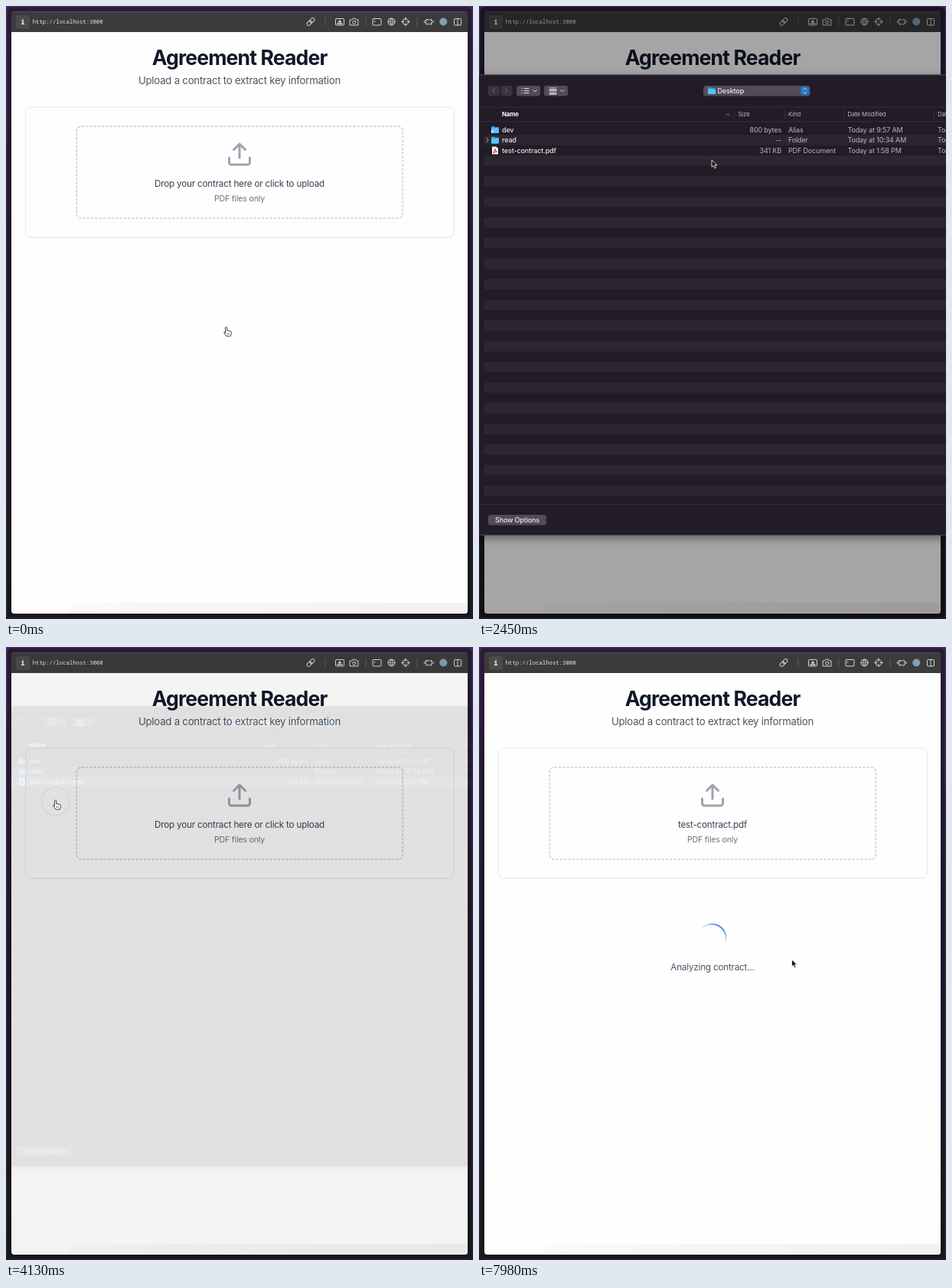
An HTML page for the animation above (8000 ms loop, 610 px wide and 800 px high).

```html
<!DOCTYPE html>
<html lang="en">
<head>
<meta charset="utf-8">
<title>Agreement Reader</title>
<style>
  html, body { margin: 0; width: 100%; height: 100%; overflow: hidden; background: #17121f; }
  svg { display: block; width: 610px; height: 800px; }
  text { font-family: Inter, sans-serif; letter-spacing: -.017em; }
  .mid { text-anchor: middle; }
  .end { text-anchor: end; }
  .mono { font-family: "Noto Sans Mono", monospace; letter-spacing: 0; font-weight: 500; }
  .line { fill: none; stroke-linecap: round; stroke-linejoin: round; }
  #dialog text { font-size: 9px; fill: #b9b5bd; }
  #dialog .name { fill: #e9e7eb; font-weight: 500; }
  #dialog .head { font-size: 7.8px; fill: #bcb8c0; }
</style>
</head>
<body>
<svg viewBox="0 0 610 800">
  <defs>
    <linearGradient id="backdrop" x2="0" y2="1">
      <stop offset="0" stop-color="#4a2369"/><stop offset=".3" stop-color="#2c1c48"/>
      <stop offset=".75" stop-color="#1e172c"/><stop offset="1" stop-color="#17161b"/>
    </linearGradient>
    <linearGradient id="chrome" x2="0" y2="1">
      <stop offset="0" stop-color="#2b1b3a"/><stop offset=".5" stop-color="#1d162b"/>
      <stop offset="1" stop-color="#18171c"/>
    </linearGradient>
    <linearGradient id="footer" x2="1" y2="0">
      <stop offset="0" stop-color="#f9f9fa"/><stop offset="1" stop-color="#f1f1f3"/>
    </linearGradient>
    <filter id="shadow" x="-10%" y="-10%" width="120%" height="120%">
      <feDropShadow dx="0" dy="4" stdDeviation="6" flood-opacity=".4"/>
    </filter>
    <g id="folder">
      <path d="M0 1.2q0-1.2 1.2-1.2h2.6l1.2 1.2h4q1 0 1 1v5.6q0 1.2-1.2 1.2H1.2Q0 9 0 7.8z" fill="#2b9fdc"/>
      <rect y="2.4" width="10" height="6.6" rx="1" fill="#55c3f6"/>
    </g>
  </defs>

  <rect width="610" height="800" fill="url(#backdrop)"/>
  <rect x="1" y="1" width="608" height="798" rx="6" fill="url(#chrome)" stroke="#4b4158" stroke-width=".5"/>
  <path d="M7 34V11q0-4 4-4H599q4 0 4 4V34z" fill="#3b3b3c"/>
  <path d="M9 7.5H601" stroke="#5b575f" stroke-width=".8"/>
  <path d="M7 34H603V789q0 4-4 4H11q-4 0-4-4z" fill="#fefefe"/>
  <path d="M82 793q3-14 20-14H603v10q0 4-4 4z" fill="url(#footer)"/>

  <!-- Toolbar -->
  <rect x="13" y="12" width="18" height="18" rx="3" fill="#4b4b4c"/>
  <text class="mono mid" x="22" y="24" font-size="9" style="font-weight:700" fill="#fff">i</text>
  <text class="mono" x="34.7" y="23.3" font-size="7.3" fill="#e8e8e8">http://localhost:3000</text>
  <g class="line" stroke="#d6d6d6" stroke-width="1">
    <g transform="rotate(-45 398 20.5)">
      <rect x="392" y="18.3" width="6.8" height="4.4" rx="2.2"/>
      <rect x="397.2" y="18.3" width="6.8" height="4.4" rx="2.2"/>
    </g>
    <path d="M417 15v11M470 15v11M537 15v11" stroke="#5f5f60"/>
    <rect x="430.5" y="16.5" width="11" height="8.5" rx="1"/>
    <path d="M433 23h6M434.5 20.5h3M436 19v2" stroke-width="1.7"/>
    <path d="M449.5 18h2.2l1.2-1.7h3.6l1.2 1.7h2.3v7H449.5z"/>
    <circle cx="454.7" cy="21.2" r="2"/>
    <rect x="479" y="16.5" width="11" height="8.5" rx="1"/>
    <path d="M481 18.8l1.3 1-1.3 1" stroke-width=".8"/>
    <circle cx="503.5" cy="20.5" r="4.5"/>
    <path d="M499 20.5h9M503.5 16q-4 4.5 0 9M503.5 16q4 4.5 0 9M500 17.5q3.5 2 7 0M500 23.5q3.5-2 7 0" stroke-width=".7"/>
    <circle cx="522" cy="20.5" r="4"/>
    <path d="M522 15v3.5M522 22.5v3.5M516.5 20.5h3.5M524 20.5h3.5"/>
    <path d="M549 17.5h2q1 2 2.500 0h2v2q3-1 3 1t-3 1v2.500h-2q-1.500-2-2.500 0h-2v-2.500q-3 1-3-1t3-1z"/>
    <rect x="585.5" y="16.5" width="9" height="8.5" rx="1"/><path d="M590 16.5v8.5"/>
  </g>
  <circle cx="571.3" cy="20.5" r="5" fill="#7fa0b4"/>

  <!-- Page -->
  <text class="mid" x="305" y="77" font-size="26.6" font-weight="700" fill="#111827" style="letter-spacing:-.033em">Agreement Reader</text>
  <text class="mid" x="305" y="102" font-size="13.2" fill="#4b5563">Upload a contract to extract key information</text>
  <rect x="25.5" y="132.5" width="560" height="170" rx="7" fill="none" stroke="#f1f2f4"/>
  <rect x="25.5" y="132" width="559.5" height="169.5" rx="7" fill="#fefefe" stroke="#e8eaed"/>
  <rect id="zone" x="92.3" y="157" width="426" height="120" rx="6" fill="none" stroke-width="1.5" stroke-dasharray="3.4 1.9"/>
  <path class="line" transform="translate(287 175.5) scale(1.5)" stroke="#9ca3af" stroke-width="2"
    d="M21 15v4a2 2 0 0 1-2 2H5a2 2 0 0 1-2-2v-4M17 8l-5-5-5 5M12 3v12"/>
  <text class="mid" id="prompt" x="305" y="235.8" font-size="11.7" fill="#374151"></text>
  <text class="mid" x="305" y="255.2" font-size="10.6" fill="#6b7280">PDF files only</text>
  <g id="progress">
    <path id="spinner" d="M-18 0A18 18 0 0 0 18 0A18 16.2 0 0 1-18 0z" fill="#3b82f6"/>
    <text class="mid" x="305" y="422" font-size="11.7" fill="#4b5563">Analyzing contract...</text>
  </g>
  <rect id="dim" x="1" y="1" width="608" height="798" rx="6"/>

  <!-- File dialog -->
  <g id="dialog">
    <rect x="-20" y="99.5" width="650" height="600.5" fill="#221b27" stroke="#4c4551" filter="url(#shadow)"/>
    <g fill="#3a333f">
      <rect x="12" y="113.5" width="15" height="13.5" rx="3"/><rect x="28.5" y="113.5" width="15" height="13.5" rx="3"/>
    </g>
    <g fill="#534c58">
      <rect x="49" y="113.5" width="31" height="13.5" rx="3"/><rect x="85" y="113.5" width="31" height="13.5" rx="3"/>
      <rect x="293" y="113.5" width="139.5" height="13.5" rx="3.5"/>
      <rect x="12" y="673.5" width="76" height="13.5" rx="3.5"/>
    </g>
    <rect x="420" y="114.5" width="11.5" height="11.5" rx="3" fill="#2173bd"/>
    <g class="line" stroke="#e6e3e8">
      <path d="M20.5 117.5l-2.5 2.7 2.5 2.7M34.5 117.5l2.5 2.7-2.5 2.7" stroke="#78717d"/>
      <path d="M56 117.2h.3M56 120.2h.3M56 123.2h.3M59 117.2h6M59 120.2h6M59 123.2h6"/>
      <path d="M71 119.2l2.2 2.2 2.2-2.2M106.5 119.2l2.2 2.2 2.2-2.2"/>
      <path d="M92 116.5h9M92 121.5h9" stroke-width=".8"/>
      <path d="M92.5 119h2M96 119h2M99.5 119h1M92.5 124h2M96 124h2M99.5 124h1" stroke-width="2"/>
      <path d="M423.5 118.8l2.2-2.2 2.2 2.2M423.5 121.7l2.2 2.2 2.2-2.2"/>
      <path d="M322.8 152.2l2.2-2.2 2.2 2.2" stroke="#aaa5ae" stroke-width=".8"/>
    </g>
    <path d="M0 141.5H610M0 160.5H610M0 660H610M333.5 144v13M399.5 144v13M476.5 144v13M594.5 144v13" stroke="#3b3440" stroke-width=".8"/>
    <use href="#folder" x="299" y="115.7"/>
    <text class="name" x="311.5" y="123.3">Desktop</text>
    <text class="name" x="21" y="683.3">Show Options</text>
    <text class="head" x="30" y="153.5" style="font-weight:700;fill:#fff">Name</text>
    <text class="head" x="338.5" y="153.5">Size</text>
    <text class="head" x="404" y="153.5">Kind</text>
    <text class="head" x="481.5" y="153.5">Date Modified</text>
    <text class="head" x="599" y="153.5">Date Added</text>
    <g id="stripes"></g>
    <rect id="selection" x="5" y="191.3" width="620" height="13.4" rx="3" fill="#30586e"/>
    <g id="rows"></g>
    <use href="#folder" x="16" y="166.5"/>
    <path d="M16 175.5v-3.5h3.5z" fill="#fff"/>
    <use href="#folder" x="16" y="180"/>
    <path class="line" d="M9.8 182l2.5 2.5-2.5 2.5" stroke="#b9b5bd"/>
    <path d="M17 193h5.5l2.5 2.5v7.5H17z" fill="#f3f1f2"/>
    <path class="line" d="M19 201q2-3 2-5q0 3 2.5 4q-2-.5-4.5 1" stroke="#d2382f"/>
  </g>

  <circle id="ring" fill="none" stroke-width="1.8"/>
  <g id="cursor">
    <path id="arrow" d="M0 0V9.2L2.2 7.2 3.8 10.7 5.5 9.9 4 6.6H7z" fill="#111" stroke="#fff" stroke-width=".8"/>
    <path id="hand" d="M-1 7.8V1a1.1 1.1 0 0 1 2.2 0V4.8q1.5-1 2.2.4q1.500-.8 2.100.5q1.300-.3 1.300 1.200v2.200l-1.200 2.900h-5l-3.400-4.600q-.3-1.700 1.800-.6zM1.700 8.200v1.600M3.600 8.200v1.600"
      fill="#fff" stroke="#333" stroke-width=".9" stroke-linejoin="round"/>
  </g>
</svg>
<script>
const LOOP = 8000, STEP = 70;
const $ = id => document.getElementById(id);
const clamp = x => Math.max(0, Math.min(1, x));
const span = (t, from, to) => clamp((t - from) / (to - from));
const smooth = x => x * x * (3 - 2 * x);
const show = (id, on) => $(id).setAttribute('visibility', on ? 'visible' : 'hidden');
const set = (id, attrs) => Object.entries(attrs).forEach(([k, v]) => $(id).setAttribute(k, v));

const ROW = 13.46, FIRST_ROW = 171;
const files = [
  ['dev', '800 bytes', 'Alias', 'Today at 9:57 AM'],
  ['read', '--', 'Folder', 'Today at 10:34 AM'],
  ['test-contract.pdf', '341 KB', 'PDF Document', 'Today at 1:58 PM'],
];
for (let i = 1; i < 36; i += 2) {
  $('stripes').innerHTML += `<rect x="6" y="${FIRST_ROW + (i - .5) * ROW}" width="620" height="${ROW}" rx="2.5" fill="#2c2631"/>`;
}
files.forEach(([name, size, kind, date], i) => {
  const cell = (x, label, cls = '') => `<text x="${x}" y="${FIRST_ROW + 3.2 + i * ROW}" class="${cls}">${label}</text>`;
  $('rows').innerHTML += cell(30, name, 'name') + cell(395, size, 'end') + cell(404, kind) + cell(481.5, date) + cell(599, 'Today');
});

// Cursor legs: start, end, destination
const origin = [287.5, 419];
const legs = [[70, 1540, 304, 201], [2590, 3290, 64.5, 200], [4200, 4760, 408.5, 408]];
const clicks = [1820, 3570, 3850];

function cursorAt(t) {
  let [x, y] = origin;
  for (const [from, to, toX, toY] of legs) {
    const k = smooth(span(t, from, to));
    x += (toX - x) * k;
    y += (toY - y) * k;
  }
  return [x, y];
}

function draw(t) {
  const [x, y] = cursorAt(t);
  const analyzing = t >= 4270;
  const closing = t >= 3990;
  const open = closing ? 1 - span(t, 3990, 4160) : 1 - (1 - span(t, 2380, 2620)) ** 3;

  set('dim', { opacity: .55 * (closing ? open ** 1.5 : open) });
  set('dialog', {
    opacity: closing ? open ** 1.4 : Math.min(1, open * 2),
    transform: `translate(0 ${-27 * (1 - open)})`,
  });
  show('dialog', open > 0);
  show('selection', t >= 3570);

  const hover = !analyzing && t < 4060 && x > 92 && x < 518 && y > 157 && y < 277;
  set('zone', { stroke: hover ? '#3388f0' : '#cbced4' });
  $('prompt').textContent = analyzing ? 'test-contract.pdf' : 'Drop your contract here or click to upload';
  show('progress', analyzing);
  set('spinner', { transform: `translate(305 379) rotate(${215 + (t - 4830) / 1050 * 360})` });

  const click = clicks.filter(c => c <= t).pop() ?? -LOOP;
  const age = span(t, click, click + 420);
  set('ring', {
    cx: x + .5, cy: y + 1, r: 7 + 14 * Math.sqrt(age),
    stroke: open > .5 ? '#7fa5b5' : '#a3a7ad', opacity: .9 * (1 - age) ** 1.5,
  });

  const hand = t < 2240 || (t >= 4060 && !analyzing);
  set('cursor', { transform: `translate(${x} ${y})` });
  show('hand', hand);
  show('arrow', !hand);
}

function tick() {
  const t = performance.now() % LOOP;
  draw(Math.floor(t / STEP) * STEP);
  requestAnimationFrame(tick);
}
tick();
</script>
</body>
</html>
```
